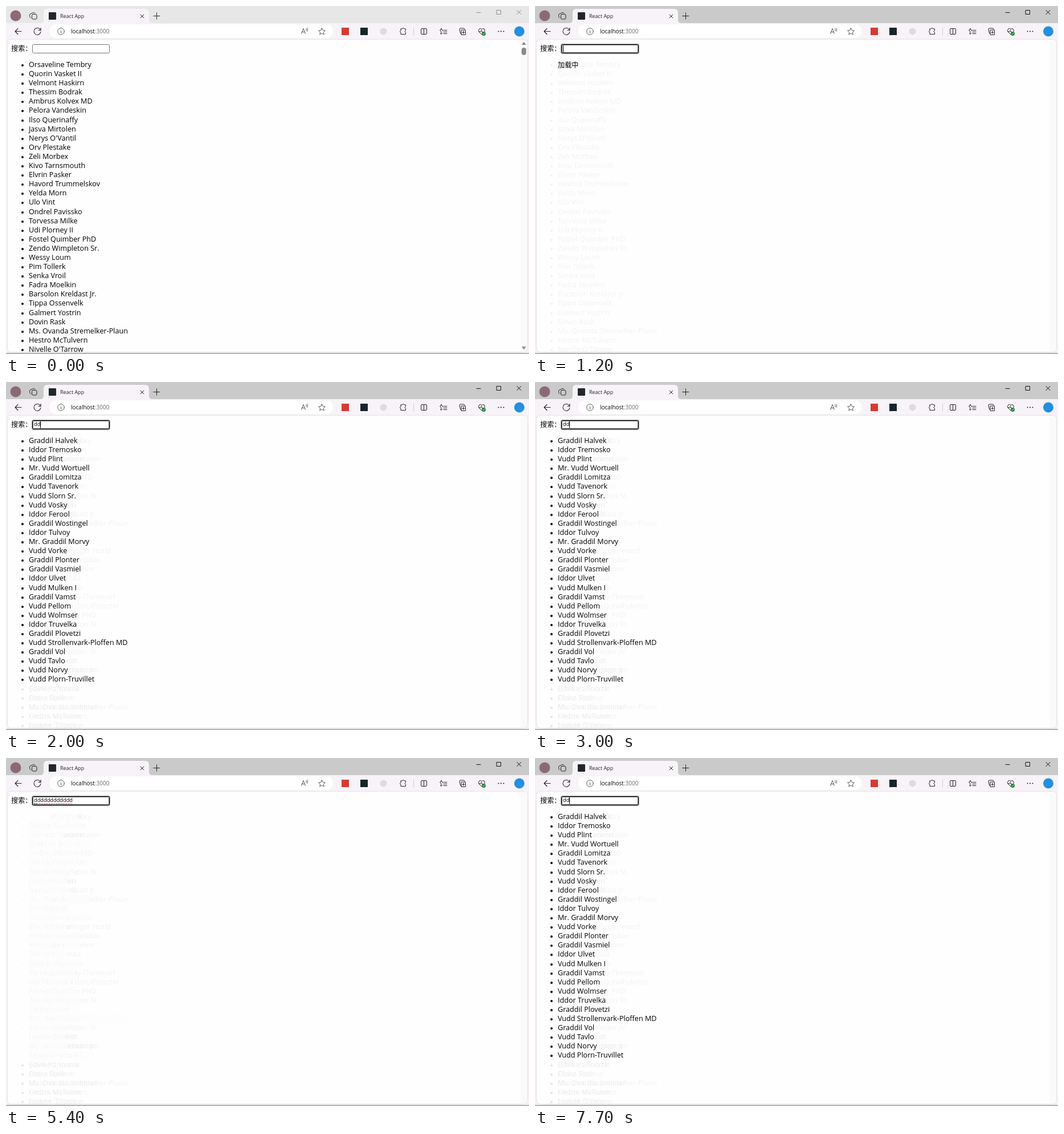
Recreate the animation shown at these times as an HTML page. Size 918 by 610 pixels, loop 8 s.

```html
<!DOCTYPE html>
<html lang="zh">
<head>
<meta charset="utf-8">
<title>React App</title>
<style>
  html, body { margin: 0; width: 100%; height: 100%; overflow: hidden; }
  body { --paper: #fefefe; position: relative; background: #f7f3f8; font-family: "Open Sans", "Noto Sans", sans-serif; color: #000; }
  svg { position: absolute; left: 0; top: 0; display: block; }
  .page { position: absolute; left: 3px; top: 59px; width: 912px; height: 547px; overflow: hidden; border-radius: 6px; background: var(--paper); box-shadow: 0 0 2px #bdb9be; }
  .page > * { position: absolute; }
  .label, .loading { font: 12.2px/16px "Noto Sans CJK SC", "Noto Sans CJK", sans-serif; white-space: nowrap; }
  .label { left: 6px; top: 7px; }
  .loading { left: 37px; top: 36px; background: var(--paper); }
  .box { left: 43px; top: 8px; width: 136px; height: 16px; box-sizing: border-box; border: 1px solid #767676; border-radius: 2.5px; background: #fff; }
  .box.focus { border-color: #101010; box-shadow: inset 0 0 0 1px #777, 0 0 0 1px #999; }
  .typed { left: 46px; top: 7px; font-size: 9.25px; line-height: 16px; }
  .caret { top: 10px; width: 1px; height: 12px; background: #000; }
  .wave { left: 46px; top: 20px; width: 68px; height: 2px; background: repeating-linear-gradient(90deg, #e23a3a 0 1.5px, transparent 1.5px 3px); }
  ul { left: 37px; top: 36px; margin: 0; padding: 0; list-style: none; font-size: 12.6px; line-height: 16.1px; white-space: nowrap; }
  li { position: relative; height: 16.1px; }
  li::before { content: ""; position: absolute; left: -13px; top: 7px; width: 4px; height: 4px; border-radius: 50%; background: currentColor; }
  .ghost { color: rgba(0, 0, 0, .05); }
  .front span { background: var(--paper); }
  .erased { color: var(--paper); }
  .erased span { background: rgba(254, 254, 254, .5); }
  .bar { right: 0; top: 0; width: 12px; height: 547px; background: #fafafa; }
  .bar i { position: absolute; left: 2px; width: 8px; top: 14px; height: 13px; border-radius: 4px; background: #8a8a8a; }
  .bar b { position: absolute; left: 2px; border: 4px solid transparent; }
  .bar b:first-child { top: 0; border-bottom: 5px solid #8a8a8a; }
  .bar b:last-child { bottom: 0; border-top: 5px solid #8a8a8a; }
</style>
</head>
<body>
<svg width="918" height="610" viewBox="0 0 918 610" fill="none" stroke="#242424" stroke-width="1" stroke-linecap="round" stroke-linejoin="round">
  <rect id="strip" width="918" height="30" stroke="none"/>
  <path d="M60 30Q66 30 66 24V12Q66 5 73 5H244Q251 5 251 12V24Q251 30 257 30Z" fill="#f7f3f8" stroke="none"/>
  <rect y="608" width="918" height="2" fill="#b4b2b5" stroke="none"/>
  <circle cx="17" cy="17" r="9.5" fill="#8b6a78" stroke="none"/>
  <rect x="45.500" y="14.500" width="8.500" height="8.500" rx="2"/>
  <path d="M43.500 21Q41.500 19.500 41.500 17.500V16Q41.500 14.500 43 13.800L47.500 11.800Q49.500 11.200 51 12.500"/>
  <rect x="75" y="11" width="13" height="13" rx="1" fill="#20262c" stroke="none"/>
  <text x="95" y="21" font-size="9" fill="#222" stroke="none">React App</text>
  <path d="M236 15L242 21M242 15L236 21M259 17.500H270M264.500 12V23"/>
  <path id="controls" d="M826 11.500H833M861.500 7.500H868.500V14.500H861.500ZM897 7.500L904 14.500M904 7.500L897 14.500"/>

  <path d="M27 44.500H16M21 39.500L16 44.500L21 49.500" stroke-width="1.1"/>
  <path d="M60.500 42A6 6 0 1 0 61 45M61 38.500V42.500H57" stroke-width="1.1"/>
  <rect x="76" y="32" width="498" height="24" rx="12" fill="#fff" stroke="none"/>
  <g stroke="#555">
    <circle cx="96.500" cy="44.500" r="5.800"/>
    <path d="M96.500 43.500V47.500M96.500 41.500V41.600"/>
    <path d="M518.500 48.500L522 39.500L525.500 48.500M519.800 45.500H524.200M526.500 40Q528 41.500 527 43.500M528.500 38.500Q531 41.500 529 44.500"/>
    <path id="star"/>
  </g>
  <text x="114" y="48" font-size="10" fill="#111" stroke="none">localhost<tspan fill="#6a6a6a">:3000</tspan></text>
  <g stroke="none">
    <rect x="589" y="38" width="13" height="13" fill="#d83a30"/>
    <rect x="622" y="38" width="13" height="13" fill="#15242e"/>
    <circle cx="662.500" cy="44.500" r="6" fill="#dedbdf"/>
    <circle cx="901" cy="44.500" r="9" fill="#248fe0"/>
  </g>
  <path d="M693 40H695.500A1.800 1.800 0 0 1 699 40H701.500V43A1.800 1.800 0 0 0 701.500 46.500V49.500H693V46.500A1.800 1.800 0 0 1 693 43Z"/>
  <path d="M715.500 38V51" stroke="#d2cdd3"/>
  <rect x="728.500" y="39.500" width="10" height="10" rx="1.500"/>
  <path d="M733.500 39.500V49.500"/>
  <path d="M768 42.500H765.500L764 39L762.500 42.500H761.500L764 45L763 49.500L766 47.500M769 42.500H774M768 45.500H774M768 48.500H774"/>
  <path d="M799 48H797.500L796 41Q796 39 798 39H803Q805 39 805 41M799.500 42H806.500V50.500H799.500ZM803 44V48.500M801 46.200H805"/>
  <path d="M835 50L830 45Q828.500 42 831 40Q833.500 38.500 835 41Q836.500 38.500 839 40Q841.500 42 840 45M830 45H833L834.500 42.500L836 46"/>
  <circle cx="838.500" cy="48.500" r="3.500" fill="#19823b" stroke="none"/>
  <path d="M837 48.500L838.200 49.700L840.300 47.300" stroke="#fff" stroke-width=".8"/>
  <path d="M864.500 44.500H864.600M868.900 44.500H869M873.400 44.500H873.500" stroke-width="2"/>
</svg>

<div class="page">
  <ul id="base"></ul>
  <ul id="one"></ul>
  <ul id="two"></ul>
  <div class="loading" id="loading">加载中</div>
  <div class="label">搜索：</div>
  <div class="box" id="box"></div>
  <div class="typed" id="typed"></div>
  <div class="wave" id="wave"></div>
  <div class="caret" id="caret"></div>
  <div class="bar"><span id="bar"><b></b><i id="thumb"></i><b></b></span></div>
</div>

<script>
const $ = id => document.getElementById(id);
const split = s => s.trim().split(/\s*,\s*/);

const people = split(`Orsaveline Tembry, Quorin Vasket II, Velmont Haskirn, Thessim Bodrak,
  Ambrus Kolvex MD, Pelora Vandeskin, Ilso Querinaffy, Jasva Mirtolen, Nerys O'Vantil,
  Orv Plestake, Zeli Morbex, Kivo Tarnsmouth, Elvrin Pasker, Havord Trummelskov, Yelda Morn,
  Ulo Vint, Ondrel Pavissko, Torvessa Milke, Udi Plorney II, Fostel Quimber PhD,
  Zendo Wimpleton Sr., Wessy Loum, Pim Tollerk, Senka Vroil, Fadra Moelkin,
  Barsolon Kreldast Jr., Tippa Ossenvelk, Galmert Yostrin, Dovin Rask,
  Ms. Ovanda Stremelker-Plaun, Hestro McTulvern, Nivelle O'Tarrow`);

const further = split(`Meldi Korth, Mr. Toldan Vasings, Mrs. Edra Fallinger Hond, Brendo Kalvetti,
  Miss Judva Terlarvin, Perrin Molunda, Adlo Visterna, Verdina Skundy-Thimmerl,
  Mildra Tolpin-Gurolfsdottel, Adveth Norsk, Brando Ullick, Cadmis Perl, Wendrix Talburth,
  Tandor Wosfelder IV, Hyldra Quandt, Mordan Stelmelinder, Yandro Veskell, Edvik Pannorsk,
  Fildra Stolmin, Muldrek Bosenhider, Cedrix Malvoon, Ludvek Tamor`);

const doubles = split(`Graddil Halvek, Iddor Tremosko, Vudd Plint, Mr. Vudd Wortuell,
  Graddil Lomitza, Vudd Tavenork, Vudd Slorn Sr., Vudd Vosky, Iddor Ferool, Graddil Wostingel,
  Iddor Tulvoy, Mr. Graddil Morvy, Vudd Vorke, Graddil Plonter, Graddil Vasmiel, Iddor Ulvet,
  Vudd Mulken I, Graddil Vamst, Vudd Pellom, Vudd Wolmser, Iddor Truvelka, Graddil Plovetzi,
  Vudd Strollenvark-Ploffen MD, Graddil Vol, Vudd Tavlo, Vudd Norvy, Vudd Plorn-Truvillet`);

function fill(id, names) {
  for (const name of names) {
    const li = document.createElement('li');
    const span = document.createElement('span');
    span.textContent = name;
    li.append(span);
    $(id).append(li);
  }
}
fill('base', people);
fill('one', people.filter(n => n.includes('d')).concat(further));
fill('two', doubles);

const star = Array.from({ length: 10 }, (_, i) => {
  const r = i % 2 ? 3 : 6.3, a = (i / 5 - .5) * Math.PI;
  return (554.5 + r * Math.cos(a)).toFixed(1) + ' ' + (45 + r * Math.sin(a)).toFixed(1);
});
$('star').setAttribute('d', 'M' + star.join('L') + 'Z');

const LOOP = 8000;
const ADVANCE = 5.67;
// [time, number of letters in the field]
const counts = [[0, 0], [1300, 1], [2000, 2], [3100, 3], [3700, 4], [3900, 5], [4100, 6],
  [4200, 7], [4300, 8], [4500, 9], [4600, 10], [4700, 11], [4900, 12], [6200, 11], [6300, 10],
  [6600, 9], [6700, 8], [6900, 7], [7000, 6], [7200, 5], [7300, 4], [7400, 3], [7700, 2]];
const views = [[0, 'all'], [1200, 'wait'], [1300, 'one'], [2000, 'two'], [3100, 'none'], [7700, 'two']];
const strips = [[0, '#e8e7e8'], [500, '#d9d8d9'], [600, '#cacaca']];
const loads = [[1200, 1300], [4700, 5000], [6200, 6400], [7300, 7500]];
const blinks = [[0, 1100], [1700, 2000], [2500, 3000], [3500, 3700], [5400, 5900]];

const at = (track, t) => track.reduce((v, s) => t >= s[0] ? s[1] : v, track[0][1]);
const within = (spans, t) => spans.some(([a, b]) => t >= a && t < b);
const show = (id, on) => { $(id).style.display = on ? '' : 'none'; };

function draw(t) {
  const n = at(counts, t), view = at(views, t), busy = within(loads, t);

  $('strip').setAttribute('fill', at(strips, t));
  $('controls').setAttribute('stroke', t < 500 ? '#8c8c8c' : '#111');

  $('base').className = view === 'all' ? '' : 'ghost';
  $('one').className = view === 'one' ? 'front' : 'ghost';
  $('two').className = view === 'two' ? 'front' : 'erased';
  show('one', t >= 1300);
  show('two', t >= 2000);

  // The spot where the notice stood stays blank
  show('loading', busy || view === 'none' && t >= 4700);
  $('loading').style.color = busy ? '#000' : 'transparent';

  $('box').className = t < 1100 ? 'box' : 'box focus';
  $('typed').textContent = 'd'.repeat(n);
  $('caret').style.left = Math.floor(46 + n * ADVANCE) + 'px';
  show('caret', !within(blinks, t));
  show('wave', t >= 5000 && t < 6200);

  show('bar', view === 'all' || view === 'one');
  $('thumb').style.height = view === 'one' ? '20px' : '13px';
}

const start = performance.now();
function tick() {
  draw((performance.now() - start) % LOOP);
  requestAnimationFrame(tick);
}
tick();
</script>
</body>
</html>
```
